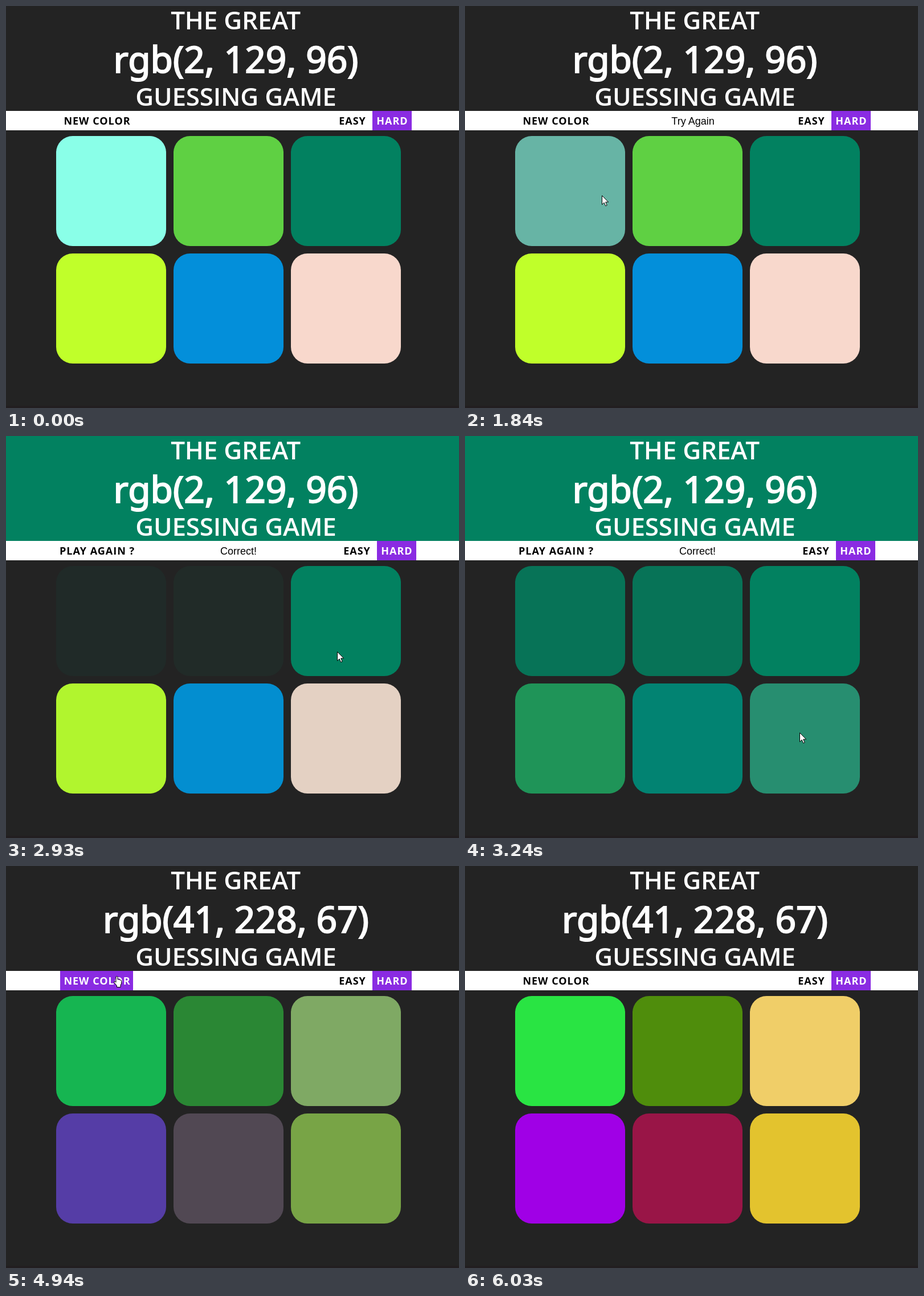
Write an HTML page that moves like this. It is 795 by 705 pixels and loops after 6.41 s.

```html
<!DOCTYPE html>
<html lang="en">
<head>
<meta charset="utf-8">
<title>Color guessing game</title>
<style>
html, body { margin: 0; width: 100%; height: 100%; overflow: hidden; background: #232323; }
svg { display: block; width: 795px; height: 705px; }
text { text-anchor: middle; }
.title { font: 600 44px "Open Sans", "Noto Sans", sans-serif; letter-spacing: -.2px; fill: #fff; }
.code { font: 400 64px "Noto Sans", "Open Sans", sans-serif; fill: #fff; stroke: #fff; stroke-width: 2; }
.button { font: 700 18px "Open Sans", "Noto Sans", sans-serif; letter-spacing: 1px; }
.message { font: 18px "Liberation Sans", Arial, sans-serif; }
#pointer path { fill: #fff; stroke: #000; stroke-width: 1; stroke-linejoin: round; }
</style>
</head>
<body>
<svg viewBox="0 0 795 705">
  <rect width="795" height="705" fill="#232323"/>
  <rect y="701" width="795" height="4" fill="#221e20"/>
  <rect id="header" width="795" height="184"/>
  <text class="title" x="403" y="41">THE GREAT</text>
  <text class="code" id="code" x="403.5" y="117"></text>
  <text class="title" x="403.5" y="175">GUESSING GAME</text>
  <rect y="184" width="795" height="34" fill="#fff"/>
  <rect id="resetBox" y="184" height="34"/>
  <text class="button" id="reset" x="160" y="208"></text>
  <text class="message" id="message" y="208"></text>
  <g id="modes">
    <text class="button" x="608" y="208">EASY</text>
    <rect x="643" y="184" width="69" height="34" fill="#8a2be2"/>
    <text class="button" x="678" y="208" fill="#fff">HARD</text>
  </g>
  <g id="squares"></g>
  <g id="pointer">
    <path id="arrow" d="M.5.5V16.2L4.1 12.8L6.7 18.6L9.2 17.5L6.7 11.9H11.7Z"/>
    <path id="hand" transform="translate(-5 0)" d="M4 1.2q1.5-1.2 3 0V6q1.5-.8 2.5.5q1.5-.6 2.3.7q1.8-.3 1.8 1.4V13L12 16V19.5H5.5V17L1 11.5Q0 9.5 2 9.3L4 11Z"/>
  </g>
</svg>
<script>
const LOOP = 6410, FADE = 670, HOVER_FADE = 300;
// The screen refreshes at an even pace between ENTER and LEAVE
const ENTER = 930, LEAVE = 6030, STEP = (LEAVE - ENTER) / 66, LEAD = 18;
const MISS_1 = 1710, MISS_2 = 2340, WIN = 2879, RESET = 4743;
const HOVER_IN = 4470, HOVER_OUT = 5140;
const $ = id => document.getElementById(id);

const rgb = hex => [1, 3, 5].map(i => parseInt(hex.slice(i, i + 2), 16));
const css = c => `rgb(${c.map(Math.round).join(", ")})`;
const mix = (a, b, p) => a.map((v, i) => v + (b[i] - v) * p);
const [DARK, BLACK, WHITE, VIOLET] = ["#232323", "#000000", "#ffffff", "#8a2be2"].map(rgb);

const before = ["#8affe8", "#5fd043", "#028160", "#c0ff2a", "#038fda", "#f8d8cc"].map(rgb);
const after = ["#29e443", "#4f8d0c", "#f0ce68", "#a000e6", "#991547", "#e3c32e"].map(rgb);
const firstAnswer = before[2], secondAnswer = after[0];

// Pointer stops: time, x, y
const route = [
  [ENTER, 724, 677], [1440, 214, 340], [1610, 240, 332], [1900, 240, 332], [2900, 580, 360],
  [3240, 587, 518], [3320, 585, 541], [3700, 585, 541], [4400, 230, 225],
  [4640, 194, 193], [5030, 194, 193], [5720, 757, 600], [LEAVE, 772, 706]
];

// The CSS "ease" curve
function ease(x) {
  if (x <= 0) return 0;
  if (x >= 1) return 1;
  const bezier = (s, a, b) => 3 * s * (1 - s) ** 2 * a + 3 * s * s * (1 - s) * b + s ** 3;
  let lo = 0, hi = 1;
  for (let i = 0; i < 24; i++) {
    const s = (lo + hi) / 2;
    if (bezier(s, .25, .25) < x) lo = s; else hi = s;
  }
  return bezier(lo, .1, 1);
}

function squareColor(i, t) {
  const changes = [[WIN, firstAnswer], [RESET, after[i]]];
  if (i < 2) changes.unshift([i ? MISS_2 : MISS_1, DARK]);
  return changes.reduce((color, [start, target]) => mix(color, target, ease((t - start) / FADE)), before[i]);
}

function pointerAt(t) {
  const i = route.findIndex(stop => stop[0] > t);
  const [[t0, ...from], [t1, ...to]] = [route[i - 1], route[i]];
  return mix(from, to, (t - t0) / (t1 - t0));
}

function set(el, attrs) {
  for (const name in attrs) el.setAttribute(name, attrs[name]);
  return el;
}

const squares = before.map((_, i) => {
  const rect = document.createElementNS("http://www.w3.org/2000/svg", "rect");
  const x = 88 + i % 3 * 206, y = 228 + Math.floor(i / 3) * 206;
  return $("squares").appendChild(set(rect, { x, y, width: 193, height: 193, rx: 29 }));
});

function drawPointer(t) {
  const visible = t >= ENTER && t < LEAVE;
  set($("pointer"), { visibility: visible ? "visible" : "hidden" });
  if (!visible) return;
  const pointing = t >= HOVER_IN && t < HOVER_OUT;
  set($("pointer"), { transform: `translate(${pointerAt(t).map(Math.round)})` });
  set($("arrow"), { display: pointing ? "none" : "inline" });
  set($("hand"), { display: pointing ? "inline" : "none" });
}

function draw(t) {
  const fresh = t >= RESET, won = t >= WIN && !fresh, missed = t >= MISS_1 && !fresh;
  const hover = ease((t - HOVER_IN) / HOVER_FADE) - ease((t - HOVER_OUT) / HOVER_FADE);

  set($("header"), { fill: css(won ? firstAnswer : DARK) });
  $("code").textContent = css(fresh ? secondAnswer : firstAnswer);
  $("reset").textContent = won ? "PLAY AGAIN ?" : "NEW COLOR";
  $("message").textContent = won ? "Correct!" : missed ? "Try Again" : "";
  set($("message"), { x: won ? 408 : 400 });
  set($("modes"), { transform: `translate(${won ? 8 : 0})` });
  set($("resetBox"), { x: won ? 87 : 95, width: won ? 144 : 128, fill: css(mix(WHITE, VIOLET, hover)) });
  set($("reset"), { fill: css(mix(BLACK, WHITE, hover)) });
  squares.forEach((square, i) => set(square, { fill: css(squareColor(i, t)) }));
  drawPointer(t);
}

function tick() {
  const step = Math.floor((performance.now() % LOOP - ENTER + LEAD) / STEP);
  draw(step < 0 ? 0 : Math.min(ENTER + step * STEP, LEAVE));
  requestAnimationFrame(tick);
}
tick();
</script>
</body>
</html>
```
